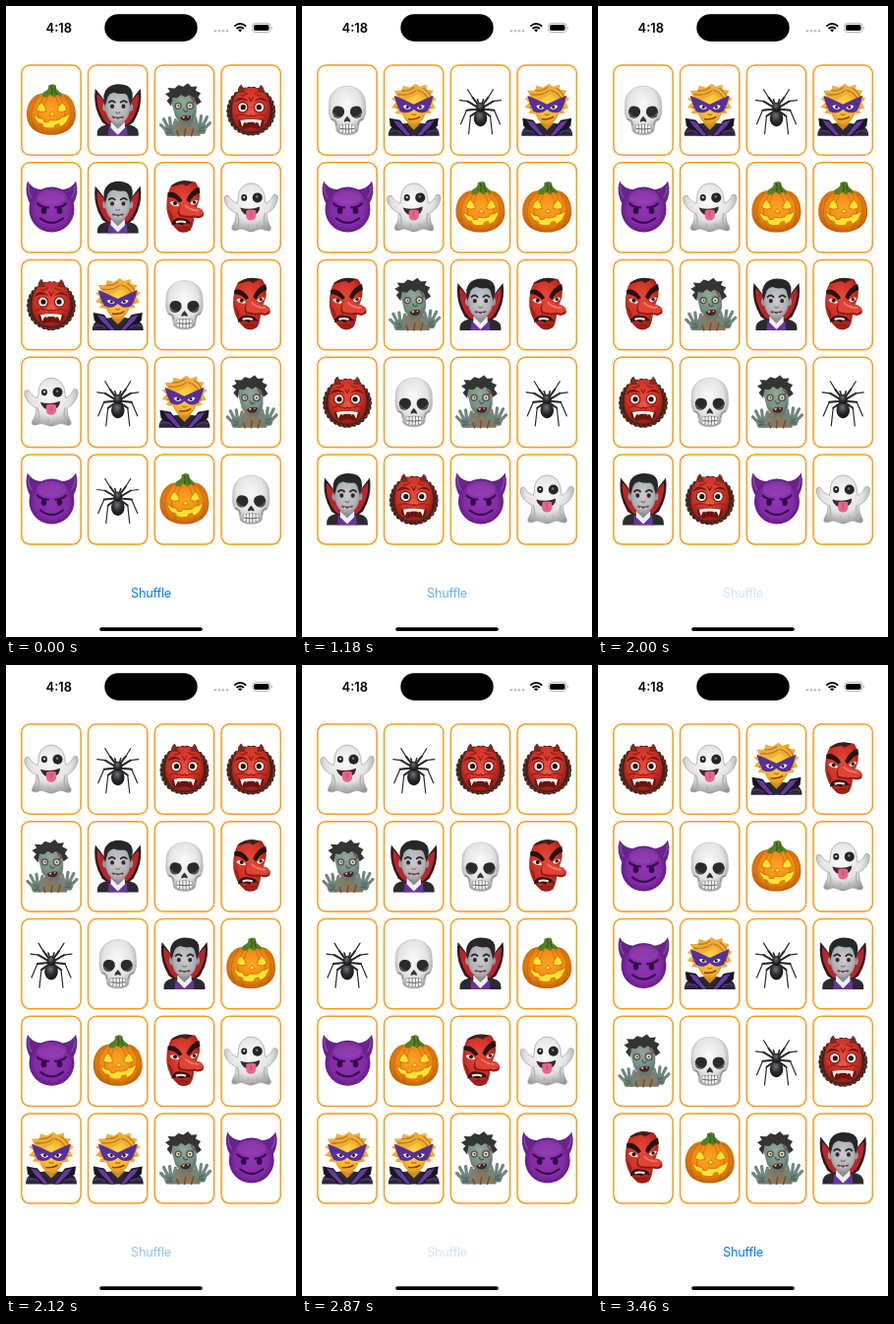
An HTML page that plays this animation: 295 by 640 pixels, repeating every 4.07 s.

```html
<!DOCTYPE html>
<html lang="en">
<head>
<meta charset="utf-8">
<title>Shuffle</title>
<style>
html, body { margin: 0; width: 100%; height: 100%; overflow: hidden; background: #fff; }
svg { display: block; width: 295px; height: 640px; overflow: hidden; }
text { font-family: Inter, "Liberation Sans", sans-serif; text-anchor: middle; }
.clock { font-size: 12.9px; font-weight: 600; }
.button { font-size: 12.7px; letter-spacing: -.2px; fill: #007aff; animation: press 4070ms step-end infinite; }
.card { fill: #fff; stroke: #f99b16; stroke-width: 1.5; }
.strip { animation: deal 4070ms step-end infinite; }
.line { fill: none; stroke-linecap: round; stroke-linejoin: round; }

/* each hand of cards sits one stage further right */
@keyframes deal {
  0% { transform: translateX(0); }
  28.99% { transform: translateX(-295px); }
  52.08% { transform: translateX(-590px); }
  73.7%, 100% { transform: translateX(-885px); }
}
@keyframes press {
  0%, 37.1%, 62.4%, 85.01%, 100% { opacity: 1; }
  26.28%, 49.13%, 70.51% { opacity: .2; }
  28.99% { opacity: .6; }
  31.44% { opacity: .8; }
  52.08%, 73.7% { opacity: .45; }
  54.54%, 76.41% { opacity: .65; }
  57%, 79.36% { opacity: .8; }
  34.39%, 59.7%, 82.06% { opacity: .93; }
}
</style>
</head>
<body>
<svg viewBox="0 0 295 640">
<defs>
  <radialGradient id="orange" cx=".5" cy=".45" r=".58"><stop offset="0" stop-color="#ffa526"/><stop offset=".6" stop-color="#f08a14"/><stop offset="1" stop-color="#b95a08"/></radialGradient>
  <radialGradient id="purple" cx=".5" cy=".5" r=".52"><stop offset="0" stop-color="#8f35b2"/><stop offset=".7" stop-color="#822ca5"/><stop offset="1" stop-color="#611a85"/></radialGradient>
  <radialGradient id="red" cx=".48" cy=".4" r=".62"><stop offset="0" stop-color="#e94a3a"/><stop offset=".6" stop-color="#cf3227"/><stop offset="1" stop-color="#8f1a14"/></radialGradient>
  <radialGradient id="white" cx=".48" cy=".38" r=".64"><stop offset="0" stop-color="#fafafa"/><stop offset=".6" stop-color="#e3e3e4"/><stop offset="1" stop-color="#98989b"/></radialGradient>
  <radialGradient id="grey" cx=".5" cy=".5" r=".6"><stop offset="0" stop-color="#c9cbcf"/><stop offset=".65" stop-color="#b0b2b7"/><stop offset="1" stop-color="#82858b"/></radialGradient>
  <radialGradient id="green" cx=".5" cy=".4" r=".7"><stop offset="0" stop-color="#93a79b"/><stop offset=".6" stop-color="#788f85"/><stop offset="1" stop-color="#52675f"/></radialGradient>
  <radialGradient id="yellow" cx=".5" cy=".4" r=".65"><stop offset="0" stop-color="#ffd34d"/><stop offset=".7" stop-color="#f7b32c"/><stop offset="1" stop-color="#d38817"/></radialGradient>
  <radialGradient id="ink" cx=".45" cy=".35" r=".65"><stop offset="0" stop-color="#707276"/><stop offset=".5" stop-color="#303135"/><stop offset="1" stop-color="#0e0e10"/></radialGradient>

  <!-- pumpkin -->
  <g id="p">
    <path d="M-7-17Q0-20 8-17C19-18 25-7 25 4C25 17 15 25 0 25C-15 25-25 17-25 4C-25-7-18-18-7-17Z" fill="url(#orange)"/>
    <g class="line" stroke="#b75a08" stroke-width="1" opacity=".55">
      <path d="M-7-15Q-19 3-8 23M8-15Q20 3 9 23M-3-15Q-7-7-8 0M4-15Q8-7 9 0M-13-14Q-26 3-16 20M14-14Q26 3 16 20"/>
    </g>
    <path d="M-9-14Q-10-18-5-20Q-2-22-3-25Q2-28 5-25Q4-22 8-19Q12-17 10-14L6-16L3-13L-1-16L-5-13Z" fill="#557f25"/>
    <path d="M0-24Q2-20 0-16M4-23Q3-19 6-16" class="line" stroke="#315b18" stroke-width="1.2"/>
    <g fill="#ffe332" stroke="#cf7409" stroke-width=".9" stroke-linejoin="round">
      <path d="M-10-8Q-5-3-5 1Q-10 3-15 0Q-14-5-10-8ZM11-8Q6-3 6 1Q11 3 16 0Q15-5 11-8ZM1 1L4 5Q1 6-2 5Z"/>
      <path d="M-18 4Q-13 9-8 9L-7 12H-3L-2 10Q5 11 9 9L10 7Q15 7 19 3Q17 14 9 17L8 14L4 15L3 18Q-4 19-8 17L-9 14L-13 13Q-17 9-18 4Z"/>
    </g>
  </g>

  <!-- vampire -->
  <g id="v">
    <g id="cape">
      <path d="M-23-22Q-25-8-20 4L-16 12L-8 18L-3 6Q-13-10-23-22Z" fill="#2b1a1d"/>
      <path d="M-21-17Q-22-6-18 2Q-15 10-10 14L-3 18L-5 4Q-12-8-21-17Z" fill="#b9252a"/>
    </g>
    <use href="#cape" transform="scale(-1 1)"/>
    <path d="M-21 26Q-22 17-13 15L0 13L13 15Q22 17 21 26Z" fill="#2a2a30"/>
    <path d="M-7 12H7L8 26H-8Z" fill="#eeeef2"/>
    <path d="M-9 16L0 25L9 16L10 26H-10Z" fill="#67369c"/>
    <path d="M-6 8H6V13L0 19L-6 13Z" fill="#8a8d94"/>
    <ellipse cx="-13" cy="-3" rx="2.5" ry="4" fill="#96989e"/><ellipse cx="13" cy="-3" rx="2.5" ry="4" fill="#96989e"/>
    <path d="M-13-12Q-13-23 0-23Q13-23 13-12L12 2Q10 10 4 13Q0 15-4 13Q-10 10-12 2Z" fill="url(#grey)"/>
    <path d="M-13-4Q-17-17-10-23Q-4-28 6-26Q16-24 15-13L13-4L11-11Q10-17 6-17Q1-16-4-18Q-10-17-11-11Z" fill="#26272b"/>
    <path d="M-9-8Q-6-11-3-8M9-8Q6-11 3-8" class="line" stroke="#28292d" stroke-width="1.9"/>
    <ellipse cx="-5.7" cy="-4" rx="2" ry="2.2" fill="#3d2020"/><ellipse cx="5.7" cy="-4" rx="2" ry="2.2" fill="#3d2020"/>
    <path d="M-2 2Q0 4 2 2" class="line" stroke="#7b7e84" stroke-width="1.3"/>
    <path d="M-5 7Q0 9 5 7" class="line" stroke="#713b42" stroke-width="1.8"/>
    <path d="M-3 8L-2.4 10L-1.8 8ZM3 8L2.4 10L1.8 8Z" fill="#fff"/>
  </g>

  <!-- zombie -->
  <g id="z">
    <path d="M-13 26Q-14 13-6 10H9Q17 13 16 26Z" fill="#8d775c"/>
    <path d="M-4 10L-1 17L2 13L6 17L8 10Z" fill="#647b70"/>
    <path d="M-9 18L-6 26M10 16L7 26M1 19L0 26" class="line" stroke="#64523d" stroke-width="1.5"/>
    <g transform="rotate(-5)">
      <path d="M-13-13Q-11-23 1-23Q13-22 13-9L12 3Q10 13 3 13Q-6 14-10 5Z" fill="url(#green)"/>
      <path d="M-13-5L-17-11L-14-14L-18-18L-13-20L-15-24L-8-23L-4-26L1-24L6-27L9-23L15-23L13-19L18-16L15-12L18-7L13-4L11-11L6-15L2-13L-2-16L-6-13L-11-14Z" fill="#333532"/>
      <circle cx="-6" cy="-5" r="3.6" fill="#4d5850"/><circle cx="6" cy="-4" r="4" fill="#4d5850"/>
      <circle cx="-6" cy="-5" r="2.2" fill="#ddd9b4"/><circle cx="6" cy="-4" r="2.5" fill="#ddd9b4"/>
      <circle cx="-5.7" cy="-5" r=".9" fill="#332d25"/><circle cx="6" cy="-4" r=".9" fill="#332d25"/>
      <path d="M-1-1Q0 3 3 1" class="line" stroke="#475c54" stroke-width="1.4"/>
      <path d="M-5 7Q0 4 6 6Q6 11 1 11Q-4 11-5 7Z" fill="#4a2425"/>
      <path d="M-3 6.5L0 6L-1 8H-2ZM2 6L4 6.2L3 8Z" fill="#ddd5ac"/>
      <path d="M8-12L11-8L9-7" class="line" stroke="#8b4145" stroke-width="1.3"/>
    </g>
    <g id="claw">
      <path d="M-19 25Q-22 20-18 15L-12 15Q-8 20-11 26H-18Z" fill="#667c72"/>
      <path d="M-19 20L-24 15M-17 17L-21 9M-14 16L-15 8M-11 17L-9 10M-11 21L-6 17" class="line" stroke="#71877d" stroke-width="3.2"/>
      <path d="M-18 19L-13 21M-17 23H-13" class="line" stroke="#4b6057"/>
    </g>
    <use href="#claw" transform="translate(2 -2) scale(-1 1)"/>
  </g>

  <!-- ogre -->
  <g id="o">
    <circle cy="1" r="22" fill="#44241a"/>
    <circle cy="1" r="22" class="line" stroke="#44241a" stroke-width="6" stroke-dasharray="0 4.6"/>
    <circle cy="1" r="23" class="line" stroke="#6d4433" stroke-width="1.2" stroke-dasharray="1 3.6"/>
    <path d="M-18-10Q-14-23 0-23Q14-23 18-10Q22 3 16 14Q10 22 0 22Q-10 22-16 14Q-22 3-18-10Z" fill="url(#red)"/>
    <g id="ogreHalf">
      <path d="M-13-18Q-14-23-10-26Q-7-22-6-18Z" fill="#7e2a20"/>
      <path d="M-17-8Q-12-17-3-9Q-10-13-17-8Z" fill="#641c16"/>
      <circle cx="-8.5" cy="-3" r="5.6" fill="#7f1a15"/><circle cx="-8.5" cy="-3" r="4.5" fill="#f7f3f0"/><circle cx="-8" cy="-3" r="2.6" fill="#25110d"/>
      <path d="M-15 6Q-11 3-7 5M-4-17Q-8-14-10-15" class="line" stroke="#a0221a" stroke-width="1.5"/>
      <path d="M-11 10L-9 17L-6.5 11ZM-4 10L-5 14L-2 10.5Z" fill="#fff9ee"/>
    </g>
    <path d="M-13 10Q0 7 13 10Q13 18 7 19Q0 16-7 19Q-13 18-13 10Z" fill="#6b1410"/>
    <path d="M-10 10Q0 8 10 10L9 13Q0 11-9 13Z" fill="#f4ece6"/>
    <use href="#ogreHalf"/>
    <use href="#ogreHalf" transform="scale(-1 1)"/>
    <path d="M-2-13L0-9L2-13" class="line" stroke="#8c1b16" stroke-width="1.2"/>
    <path d="M-5 5Q-3 0 0-1Q3 0 5 5Q0 8-5 5Z" fill="#e75544"/>
    <path d="M-5 5Q-2 7 0 5Q2 7 5 5" class="line" stroke="#8d1813" stroke-width="1.2"/>
  </g>

  <!-- devil -->
  <g id="d">
    <g id="horn"><path d="M-21-3Q-28-15-24-27Q-20-19-9-18Z" fill="#672489"/><path d="M-23-22Q-24-15-19-9" class="line" stroke="#8848a4" stroke-width="1.4"/></g>
    <use href="#horn" transform="translate(1 0) scale(-1 1)"/>
    <circle cx=".5" cy="2" r="23" fill="url(#purple)"/>
    <ellipse cx=".5" cy="-11" rx="15" ry="8" fill="#b26aca" opacity=".22"/>
    <path d="M-14-4Q-10 0-3 0M15-4Q11 0 4 0" class="line" stroke="#370f4f" stroke-width="2.2"/>
    <ellipse cx="-7.5" cy="3" rx="2.8" ry="3.5" fill="#300d46"/><ellipse cx="8.5" cy="3" rx="2.8" ry="3.5" fill="#300d46"/>
    <path d="M-11 11Q.5 20 12 11" class="line" stroke="#370f4f" stroke-width="2.2"/>
  </g>

  <!-- tengu -->
  <g id="t">
    <path d="M-13-23Q-3-29 11-26Q17-18 15-7L10 6Q10 17 6 23Q0 27-6 24Q-16 16-18 2Q-19-13-13-23Z" fill="url(#red)"/>
    <path d="M-17-15Q-9-18-2-7L-5-5Q-10-11-17-11ZM2-8Q6-18 15-21L16-15Q9-13 5-5Z" fill="#241412"/>
    <path d="M-14-21Q-6-29 4-27L9-26L2-22L-2-24Z" fill="#3a211c"/>
    <path d="M-15-5Q-10-9-5-2Q-11 0-15-5ZM6-5Q10-9 14-7Q11-2 7-3Z" fill="#f5eee9"/>
    <circle cx="-9.5" cy="-4.3" r="2" fill="#24100d"/><circle cx="10" cy="-5.5" r="1.7" fill="#24100d"/>
    <path d="M-13 15Q-9 9-2 11Q5 11 7 17Q2 15-2 18Q-8 15-13 18Z" fill="#301412"/>
    <path d="M-9 14Q-4 12 2 14L1 16Q-4 14-8 16Z" fill="#f1e8dd"/>
    <path d="M-16 4Q-12 8-13 12M-7 21Q-2 19 3 21" class="line" stroke="#8c1b15" stroke-width="1.4"/>
    <path d="M-4-3Q1-8 5-3Q10 0 16 1Q21 4 19 9Q15 12 10 10Q2 11-5 9Q-9 5-4-3Z" fill="#8e1a15"/>
    <path d="M-3-4Q1-8 5-3Q10 0 16 1Q20 4 18 7Q15 10 10 8Q2 9-4 7Q-7 3-3-4Z" fill="#df4436"/>
    <path d="M1-2Q6 3 14 3" class="line" stroke="#f37b6a" stroke-width="1.6"/>
  </g>

  <!-- ghost -->
  <g id="g">
    <path d="M-13-8C-14-30 14-30 14-8L15-4Q20-6 23-13Q28-14 27-8Q25 1 16 6Q16 14 20 20Q21 25 15 23Q10 20 5 23Q0 26-5 23Q-10 20-15 23Q-21 24-19 19Q-15 13-15 6Q-25 1-27-7Q-28-13-23-12Q-20-6-14-4Z" fill="url(#white)" stroke="#9c9c9e" stroke-width=".7"/>
    <path d="M-14 6Q-11 15-14 20M14 6Q12 14 15 20M-3 17V22M6 17L7 21" class="line" stroke="#b0b0b3" stroke-width="1.3"/>
    <ellipse cx="-7" cy="-10" rx="3" ry="3.4" fill="#242528"/><circle cx="-7" cy="-10.4" r="1.1" fill="#eee"/>
    <circle cx="6.5" cy="-10" r="5" fill="#242528"/><circle cx="6" cy="-11" r="1.3" fill="#777"/>
    <path d="M-11 0Q-1 3 9-1Q9 7 0 8Q-9 8-11 0Z" fill="#3a2a2f"/>
    <path d="M-5 3Q0 1 5 3L5 9Q4 13 0 13Q-5 13-5 8Z" fill="#e96489"/>
    <path d="M0 4V9" class="line" stroke="#c54570"/>
  </g>

  <!-- skull -->
  <g id="s">
    <path d="M-18.5-5C-20-31 20-31 18.5-5Q20 5 16 10Q12 11 12 15L11 21Q8 25 0 25Q-8 25-11 21L-12 15Q-12 11-16 10Q-20 5-18.5-5Z" fill="url(#white)" stroke="#b3b3b5" stroke-width=".5"/>
    <g id="socket">
      <path d="M-15 1Q-14-5-8-4Q-2-3-3 3Q-5 8-10 8Q-15 7-15 1Z" fill="#2a2b2d"/>
      <path d="M-14 3Q-12 7-8 7" class="line" stroke="#636467" stroke-width="1.2"/>
      <path d="M-16 9Q-11 10-11 15" class="line" stroke="#8e8e92" stroke-width="1.3"/>
    </g>
    <use href="#socket" transform="scale(-1 1)"/>
    <path d="M0 6Q4 10 3 12L0 11L-3 12Q-4 10 0 6Z" fill="#333437"/>
    <path d="M-8 15Q0 13 8 15L7 22Q0 24-7 22Z" fill="#77777b"/>
    <path d="M-6.3 16V21M-3.2 15.6V22M0 15.5V22M3.2 15.6V22M6.3 16V21" class="line" stroke="#f2f2f2" stroke-width="2.4"/>
    <path d="M-7 18.7Q0 20 7 18.7" class="line" stroke="#55565a" stroke-width=".9"/>
  </g>

  <!-- spider -->
  <g id="k">
    <g id="legs" class="line" stroke="#292a2d">
      <path d="M-2-5L-8-13L-13-21M-3-3L-13-9L-21-10M-3-1L-14 0L-20 14M-3 1L-10 6L-12 24" stroke-width="1.2"/>
      <path d="M-2-5L-8-13M-3-3L-13-9M-3-1L-14 0M-3 1L-10 6" stroke-width="2"/>
      <path d="M-1.5-6L-3-11" stroke-width="1.6"/>
    </g>
    <use href="#legs" transform="scale(-1 1)"/>
    <ellipse cy="8" rx="6.8" ry="8.5" fill="url(#ink)"/>
    <ellipse cy="-3" rx="4.5" ry="5" fill="url(#ink)"/>
  </g>

  <!-- masked villain -->
  <g id="m">
    <path d="M-26 26Q-26 15-13 14L0 12L13 14Q26 15 26 26Z" fill="#2b2833"/>
    <g id="collar">
      <path d="M-25 8L-14 10L-2 26H-9L-24 16Z" fill="#18171d"/>
      <path d="M-21 10L-14 12L-3 26H-7L-17 16Z" fill="#6539a3"/>
      <path d="M-24 22Q-18 19-13 23" class="line" stroke="#54338a" stroke-width="1.4"/>
    </g>
    <use href="#collar" transform="scale(-1 1)"/>
    <path d="M-6 8H6V14L0 20L-6 14Z" fill="#cd8b20"/>
    <path d="M-13-12Q-12-22 0-22Q13-22 13-12L12 3Q10 10 4 14Q0 16-4 14Q-10 10-12 3Z" fill="url(#yellow)"/>
    <path d="M-12 4L-19 3L-16-1L-23-3L-18-8L-23-12L-17-14L-20-20L-12-20L-11-25L-4-23L2-27L6-24L13-26L13-21L20-20L17-15L23-12L19-8L22-2L16-1L18 3L12 4L12-8Q8-16 3-16Q-4-11-12-10Z" fill="#f0ad36"/>
    <path d="M-16-16Q-6-14 2-20M-12-20Q-5-19 0-23M4-20Q12-18 15-10M10-22Q15-19 18-13M-17-2L-14-7M17-2L14-7" class="line" stroke="#c07b1e" stroke-width="1.3"/>
    <path d="M-20-15Q-10-11 0-6Q10-11 20-15Q18-6 14 1Q6 5 0-1Q-6 5-14 1Q-18-6-20-15Z" fill="#56309a"/>
    <path d="M-11-4Q-7-7-3-2Q-8 1-11-4ZM11-4Q7-7 3-2Q8 1 11-4Z" fill="#fff"/>
    <circle cx="-6.5" cy="-3.2" r="1.6" fill="#37201a"/><circle cx="6.5" cy="-3.2" r="1.6" fill="#37201a"/>
    <path d="M-2 4Q0 6 2 4" class="line" stroke="#b87416" stroke-width="1.2"/>
    <path d="M-5 9Q2 10 6 7" class="line" stroke="#87421e" stroke-width="1.6"/>
  </g>
</defs>

<text class="clock" x="53.8" y="27">4:18</text>
<rect x="100.3" y="8.3" width="94.4" height="27.6" rx="13.8"/>
<g fill="#bcbcbe"><circle cx="213" cy="25.3" r="1.2"/><circle cx="217" cy="25.3" r="1.2"/><circle cx="221" cy="25.3" r="1.2"/><circle cx="225" cy="25.3" r="1.2"/></g>
<g class="line" stroke="#000" stroke-width="1.9" style="stroke-linecap:butt">
  <path d="M232.2 20.6Q238.2 15.4 244.2 20.6M234.5 23.1Q238.2 20 241.9 23.1"/>
</g>
<path d="M236.1 24.3Q238.2 22.8 240.3 24.3L238.2 26.6Z"/>
<rect x="250.5" y="17.5" width="18.5" height="9" rx="3" fill="#fff" stroke="#aaa" stroke-width=".9"/>
<rect x="252" y="19" width="15.5" height="6" rx="1.7"/>
<path d="M270 20.5Q272 22 270 23.5Z" fill="#aaa"/>

<g id="cards"></g>
<g class="strip" id="strip"></g>
<text class="button" x="147.5" y="599.7">Shuffle</text>
<rect x="95.2" y="630.2" width="104.6" height="3.8" rx="1.9"/>
</svg>
<script>
const deals = [
  'pvzodvtgomstgkmzdkps',
  'smkmdgpptzvtoszkvodg',
  'gkoozvstksvpdptgmmzd',
  'ogmtdspgdmkvzskotpzv'
];
const column = i => i % 4 * 67.75;
const row = i => Math.floor(i / 4) * 98.7;

function add(parent, tag, attrs) {
  const node = document.createElementNS('http://www.w3.org/2000/svg', tag);
  for (const name in attrs) node.setAttribute(name, attrs[name]);
  parent.append(node);
}

for (let i = 0; i < 20; i++) {
  add(cards, 'rect', { class: 'card', x: 15.8 + column(i), y: 60.1 + row(i), width: 60.3, height: 91.2, rx: 8.5 });
}
deals.forEach((deal, n) => [...deal].forEach((face, i) => {
  add(strip, 'use', { href: '#' + face, x: 46 + column(i) + n * 295, y: 105.7 + row(i) });
}));
</script>
</body>
</html>
```
